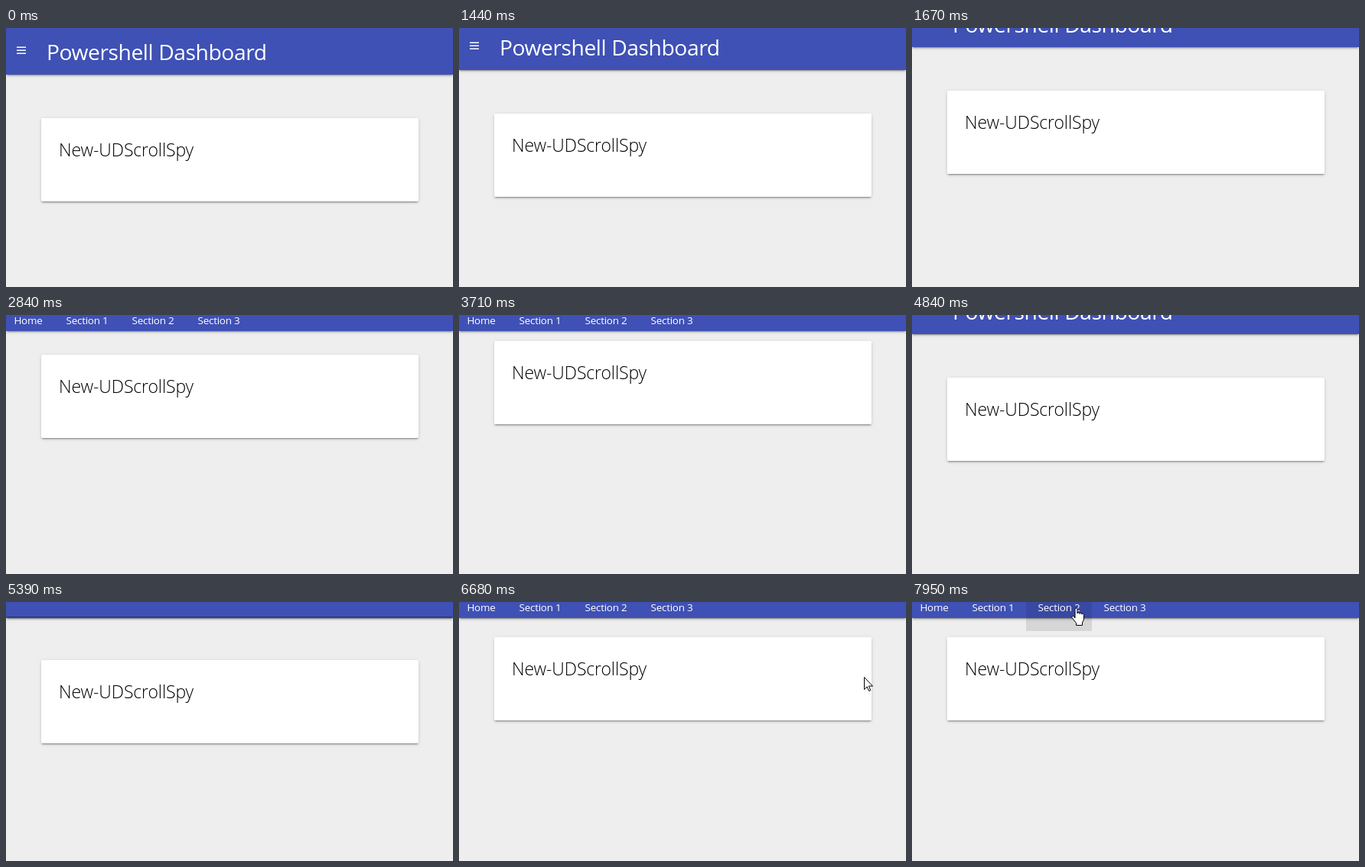
Animation of 584 by 339 pixels, one loop 8000 ms. Source, as an HTML page:

```html
<!DOCTYPE html>
<html lang="en">
<head>
<meta charset="utf-8">
<title>Scroll spy demo</title>
<style>
  html, body { margin: 0; width: 100%; height: 100%; overflow: hidden; background: #eee; }
  #stage {
    position: relative; width: 584px; height: 339px; overflow: hidden; background: #eee;
    font-family: "Open Sans", "Noto Sans", sans-serif; letter-spacing: -.015em; white-space: nowrap;
  }
  #stage * { position: absolute; box-sizing: border-box; }
  .raised {
    box-shadow: 0 2px 2px 0 rgba(0,0,0,.14), 0 1px 5px 0 rgba(0,0,0,.12), 0 3px 1px -2px rgba(0,0,0,.2);
  }
  #page { left: 0; top: 0; width: 584px; height: 339px; }
  .bar { left: 0; width: 584px; background: #3f51b5; color: #fff; }
  #header { top: 0; height: 61px; }
  #tabs { top: -43px; height: 64px; font-size: 13.44px; }
  #tabs span { top: 19px; width: 86px; height: 62px; line-height: 62px; text-align: center; }
  #title { left: 53px; top: 0; font-size: 28.2px; line-height: 62px; letter-spacing: -.015em; }
  #menu { left: 14px; top: 24px; }
  #card { left: 46px; top: 118px; width: 493px; height: 109px; border-radius: 2px; background: #fff; }
  #card span { left: 23px; top: 17px; font-size: 23px; font-weight: 300; line-height: 48px; letter-spacing: -.005em; color: #000; }
  .cursor { left: 0; top: 0; fill: #fff; stroke: #000; stroke-linejoin: round; }
</style>
</head>
<body>
<div id="stage">
  <div id="tabs" class="bar raised">
    <span style="left:-5px;width:68px">Home</span>
    <span style="left:63px">Section 1</span>
    <span id="hovered" style="left:149px">Section 2</span>
    <span style="left:235px">Section 3</span>
  </div>
  <div id="page">
    <div id="header" class="bar raised">
      <svg id="menu" width="12" height="11" stroke="#fff" stroke-width="1.4"><path d="M0 1.2h12M0 5.2h12M0 9.2h12"/></svg>
      <span id="title">Powershell Dashboard</span>
    </div>
    <div id="card" class="raised"><span>New-UDScrollSpy</span></div>
  </div>
  <svg id="arrow" class="cursor" width="13" height="20"><path d="M.5.5v16l3.7-3.6 2.4 5.6 2.2-1-2.4-5.4h5.1z"/></svg>
  <svg id="hand" class="cursor" width="18" height="25"><path d="M5 14V2.5a1.5 1.5 0 0 1 3 0V8a1.5 1.5 0 0 1 3 .5a1.5 1.5 0 0 1 3 .7a1.3 1.3 0 0 1 2.5 1V16l-2 4v3.5H6.5V20.5L1 13.5a1.5 1.5 0 0 1 2.3-1.7z"/></svg>
</div>
<script>
const LOOP = 8000;
const [page, arrow, hand, hovered] =
  ['page', 'arrow', 'hand', 'hovered'].map(id => document.getElementById(id));

// [time, scroll offset]: the page jumps as the scrollbar is dragged
const scrollSteps = [
  [0, 0], [1440, 6], [1520, 18], [1600, 30], [1670, 36], [1890, 42], [2000, 48],
  [2300, 54], [2550, 60], [2840, 66], [3240, 72], [3410, 82], [3710, 84], [3790, 72],
  [3940, 66], [4190, 60], [4270, 54], [4420, 48], [4520, 42], [4840, 36], [4920, 30],
  [5390, 42], [5540, 54], [5640, 60], [5860, 66], [6030, 72]
];
// [time, x, y] of the hand once it is over the link
const handSteps = [[7470, 209, 12], [7550, 210, 12], [7630, 209, 10], [7720, 208, 8], [7800, 208, 7]];

const stepAt = (steps, t) => steps.filter(step => step[0] <= t).pop();
const clamp = v => Math.min(1, Math.max(0, v));
const place = (el, x, y) => el.style.transform = `translate(${x}px, ${y}px)`;
const bezier = (a, b, c, u) => (1 - u) ** 2 * a + 2 * u * (1 - u) * b + u * u * c;

function draw(t) {
  place(page, 0, -stepAt(scrollSteps, t)[1]);

  const over = stepAt(handSteps, t);
  arrow.style.display = t >= 6680 && !over ? 'block' : 'none';
  hand.style.display = over ? 'block' : 'none';
  if (over) place(hand, over[1], over[2]);

  // The pointer is sampled every 79 ms on its way to the link
  const u = clamp(Math.floor((t - 6680) / 79) / 10);
  const eased = u * u * (3 - 2 * u);
  place(arrow, Math.round(bezier(529, 380, 213, eased)), Math.round(bezier(98, 126, 12, eased)));

  const fade = clamp((t - 7400) / 300);
  hovered.style.background = `rgba(0, 0, 0, ${0.1 * fade})`;
}

const start = performance.now();
function tick() {
  draw((performance.now() - start) % LOOP);
  requestAnimationFrame(tick);
}
tick();
</script>
</body>
</html>
```
